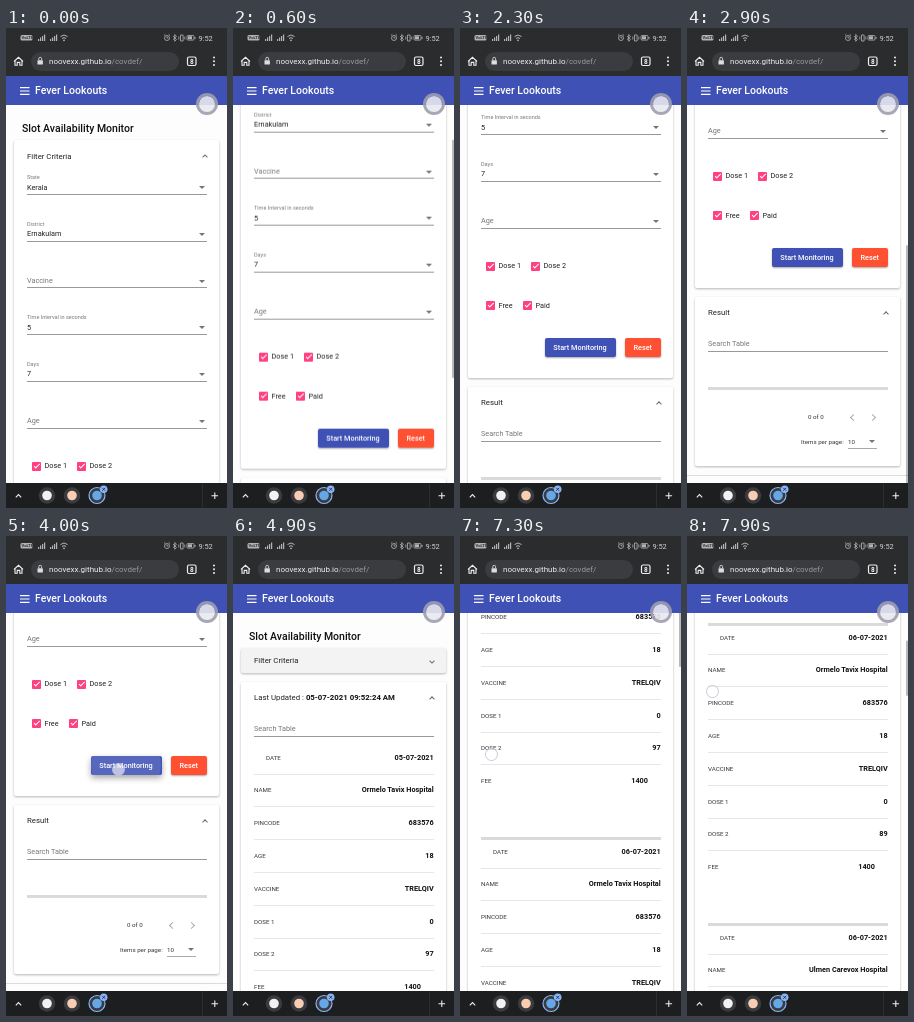
An HTML page that plays this animation: 221 by 480 pixels, repeating every 8000 ms.

```html
<!DOCTYPE html>
<html lang="en">
<head>
<meta charset="utf-8">
<title>Slot Availability Monitor</title>
<style>
html, body { margin: 0; width: 100%; height: 100%; overflow: hidden; background: #fdfdfd; }
#stage { position: relative; width: 221px; height: 480px; overflow: hidden; background: #fdfdfd;
  font: 7.3px/10px Roboto, sans-serif; color: #222; }
#stage div, #stage span, svg { position: absolute; box-sizing: border-box; }
#stage span, .btn { white-space: pre; }
#stage #page { left: 0; top: 0; width: 221px; height: 480px; }
#stage .card { position: relative; margin: 0 0 8.5px 8px; width: 205px; overflow: hidden;
  background: #fff; border-radius: 2px; }
#stage .wrap { position: relative; filter: drop-shadow(0 1px 1px rgba(0,0,0,.28)); }
#stage .foot { position: relative; height: 1px; background: #dcdcdc; }
.head { left: 0; top: 0; width: 205px; height: 33px; }
.head > * { top: calc(50% - 5px); }
.h2 { font-size: 10.5px; font-weight: 500; color: #111; }
.h3 { font-size: 7.8px; }
.label { font-size: 5.5px; color: #777; }
.hint { color: #777; }
.key { font-size: 6.2px; color: #333; }
b, .val { font-weight: 700; color: #111; }
.rule { left: 13px; width: 180px; height: 1px; background: #999; }
.thin { left: 13px; width: 180px; height: 1px; background: #e6e6e6; }
.thick { left: 13px; width: 180px; height: 3px; background: #dadada; }
.arrow { border: 3px solid transparent; border-top-color: #757575; border-bottom: 0; }
.caret { width: 4px; height: 4px; border: solid #666; border-width: 1px 0 0 1px; }
.box { width: 9px; height: 9px; border-radius: 1px; background: #ff4081; }
.box::after { content: ""; position: absolute; left: 1.8px; top: 2px; width: 4.6px; height: 2.2px;
  border: solid #fff; border-width: 0 0 1.2px 1.2px; transform: rotate(-45deg); }
.btn { height: 19px; border-radius: 2px; color: #fff; font-weight: 500; line-height: 19px;
  text-align: center; overflow: hidden; box-shadow: 0 1px 2px rgba(0,0,0,.35); }
#ripple { left: 0; top: -26px; width: 70px; height: 70px; border-radius: 50%; background: rgba(255,255,255,.13); }
.thumb { left: 218.5px; top: 48px; width: 2px; background: rgba(0,0,0,.27); }
#ring { left: -6.5px; top: -6.5px; width: 13px; height: 13px; border-radius: 50%;
  border: 1px solid rgba(185,185,210,.75); background: rgba(255,255,255,.6); }
#assist { left: 190px; top: 64.5px; width: 22px; height: 22px; border-radius: 50%;
  border: 3px solid rgba(158,158,174,.9); background: rgba(232,232,240,.9); background-clip: padding-box; }
svg { left: 0; top: 0; font-family: Roboto, sans-serif; }
</style>
</head>
<body>
<div id="stage">
  <div id="page">
    <span class="h2" style="left:16px;top:96px">Slot Availability Monitor</span>
    <div style="left:0;top:112px;width:221px">
      <div class="wrap"><div class="card" id="filter"><div class="head" id="filterHead">
        <span class="h3" style="left:13px">Filter Criteria</span>
        <span style="left:188px;width:5px;height:10px"><div class="caret" id="flip" style="left:.5px;top:3.5px"></div></span>
      </div></div></div>
      <div class="wrap"><div class="card" id="result">
        <div class="head"><span class="h3" id="idle" style="left:13px">Result</span>
          <span class="h3" id="done" style="left:13px">Last Updated : <b>05-07-2021 09:52:24 AM</b></span>
          <span style="left:188px;width:5px;height:10px"><div class="caret" style="left:.5px;top:4px;transform:rotate(45deg)"></div></span>
        </div>
        <div id="empty" style="left:0;top:0"></div>
        <div id="rows" style="left:0;top:0"></div>
      </div></div>
      <div class="foot"></div>
    </div>
  </div>
  <div class="thumb" id="thumbA" style="height:238px"></div>
  <div class="thumb" id="thumbB" style="height:55px"></div>
  <svg width="221" height="480">
    <path fill="#2b2c2e" d="M0 0h221v48H0z"/>
    <path fill="#3f51b5" d="M0 48h221v29H0z"/>
    <path fill="#1d1e20" d="M0 455h221v25H0z"/>
    <!-- status bar -->
    <g fill="#b4b4b4" font-size="7.4">
      <rect x="14.5" y="7" width="12" height="5.5" rx="1.5"/>
      <text x="15.5" y="11.4" font-size="4.2" font-weight="700" fill="#2b2c2e">VoLTE</text>
      <path d="M32 13v-2h1.2v2zM34 13v-3.5h1.2V13zM36 13V8h1.2v5zM38 13V6.5h1.2V13zM44 13v-2h1.2v2zM46 13v-3.5h1.2V13zM48 13V8h1.2v5zM50 13V6.5h1.2V13z"/>
      <path d="M54.5 8.5q3.5-3 7 0M56 10.5q2-1.7 4 0" fill="none" stroke="#b4b4b4"/>
      <circle cx="58" cy="12.3" r=".9"/>
      <g fill="none" stroke="#b4b4b4" stroke-width=".8">
        <circle cx="161" cy="10" r="2.5"/><path d="M161 8.5V10h1.3M158 7.5l1.3-1.2M164 7.5l-1.3-1.2"/>
        <path d="M167 8l3.5 3.5-1.8 1.8V6.5l1.8 1.8L167 11.7"/>
        <path d="M172.8 8.5v3M174.5 7h2.6v6h-2.6zM178.8 8.5v3"/>
        <rect x="181" y="7.5" width="7" height="4.6" rx="1"/>
      </g>
      <path d="M182 8.3h4v3h-4zM188.5 9h1v1.7h-1z"/>
      <text x="192.5" y="12.6" fill="#d0d0d0">9:52</text>
    </g>
    <!-- address bar -->
    <rect x="25" y="24" width="148" height="19" rx="9.5" fill="#3b3c40"/>
    <path d="M9 33v4.2h2.2v-2.8h2.6v2.8H16V33M8 33.5l4.5-4.2 4.5 4.2" fill="none" stroke="#eee" stroke-width="1.1"/>
    <rect x="31.5" y="32.2" width="5.4" height="4.4" rx=".6" fill="#ddd"/>
    <path d="M32.8 32v-1.3a1.4 1.4 0 0 1 2.8 0V32" fill="none" stroke="#ddd" stroke-width=".9"/>
    <text x="43" y="36.3" font-size="8" fill="#eee">noovexx.github.io<tspan fill="#999">/covdef/</tspan></text>
    <rect x="181.5" y="29" width="8.5" height="8.5" rx="1.5" fill="none" stroke="#eee" stroke-width="1.2"/>
    <text x="185.8" y="35.7" font-size="6.5" font-weight="700" fill="#eee" text-anchor="middle">8</text>
    <g fill="#eee"><circle cx="208" cy="29.5" r="1"/><circle cx="208" cy="33.3" r="1"/><circle cx="208" cy="37.1" r="1"/></g>
    <!-- app bar -->
    <path d="M14 59.7h9.5M14 63h9.5M14 66.3h9.5" stroke="#fff" stroke-width="1.2"/>
    <text x="29" y="66.4" font-size="10.5" font-weight="500" fill="#fff">Fever Lookouts</text>
    <!-- tab strip -->
    <path d="M196.5 455v25" stroke="#2c2d30"/>
    <path d="M9.8 469.3l2.7-2.7 2.7 2.7M205.5 467.8h6.6M208.8 464.5v6.6" fill="none" stroke="#eee" stroke-width="1.1"/>
    <g fill="#3a3b3f"><circle cx="41" cy="467.5" r="8.3"/><circle cx="66" cy="467.5" r="8.3"/></g>
    <circle cx="41" cy="467.5" r="4.8" fill="#f2f2f2"/>
    <circle cx="66" cy="467.5" r="4.8" fill="#f8cdb2"/>
    <circle cx="91" cy="467.5" r="8" fill="#3a3b3f" stroke="#8ab4f8" stroke-width="1.2"/>
    <circle cx="91" cy="467.5" r="4.8" fill="#64a8ea"/>
    <circle cx="97.7" cy="461.3" r="3.8" fill="#8ab4f8"/>
    <path d="M96.2 459.8l3 3M99.2 459.8l-3 3" stroke="#24324a" stroke-width=".9"/>
  </svg>
  <div id="assist"></div>
  <div id="ring"></div>
</div>
<script>
const $ = id => document.getElementById(id);

function add(box, tag, cls, css, text = '') {
  const el = document.createElement(tag);
  el.className = cls;
  el.style.cssText = css;
  el.textContent = text;
  box.append(el);
  return el;
}
// y is the vertical centre, relative to the card
const put = (box, cls, x, y, text) => add(box, 'span', cls, `left:${x}px;top:${y - 5}px`, text);
const putRight = (box, cls, x, y, text) => add(box, 'span', cls, `right:${205 - x}px;top:${y - 5}px`, text);
const line = (box, cls, y) => add(box, 'div', cls, `top:${y}px`);
const arrow = (box, x, y) => add(box, 'div', 'arrow', `left:${x - 3}px;top:${y - 1.5}px`);

// Filter form
const filter = $('filter');
[['State', 'Kerala'], ['District', 'Ernakulam'], ['Vaccine'], ['Time Interval in seconds', '5'], ['Days', '7'], ['Age']]
  .forEach(([name, value], i) => {
    const y = 47.6 + i * 46.7;
    if (value) {
      put(filter, 'label', 13, y - 10.5, name);
      put(filter, '', 13, y, value);
    } else put(filter, 'hint', 13, y, name);
    arrow(filter, 188, y);
    line(filter, 'rule', Math.round(y + 6.4));
  });
[[18, 326, 'Dose 1'], [63, 326, 'Dose 2'], [18, 365.5, 'Free'], [55, 365.5, 'Paid']].forEach(([x, y, name]) => {
  add(filter, 'div', 'box', `left:${x}px;top:${y - 4.5}px`);
  put(filter, '', x + 12.5, y, name);
});
const start = add(filter, 'div', 'btn', 'left:76.5px;top:397.5px;width:71px;background:#3f51b5', 'Start Monitoring');
add(filter, 'div', 'btn', 'left:157px;top:397.5px;width:35.5px;background:#ff5131', 'Reset');
const ripple = add(start, 'div', '', '');
ripple.id = 'ripple';

// Result table, before and after loading
const result = $('result'), empty = $('empty'), rows = $('rows');
put(result, 'hint', 13, 47.3, 'Search Table');
line(result, 'rule', 54);
empty.style.width = rows.style.width = '205px';
line(empty, 'thick', 90.5);
put(empty, 'key hint', 113, 120, '0 of 0');
for (const [x, turn] of [[155.5, -45], [174.5, 135]])
  add(empty, 'div', 'caret', `left:${x}px;top:118px;width:5px;height:5px;border-color:#aaa;transform:rotate(${turn}deg)`);
put(empty, 'key hint', 106, 145, 'Items per page:');
put(empty, 'key', 153, 145, '10');
arrow(empty, 177, 145);
add(empty, 'div', '', 'left:153px;top:151px;width:29px;height:1px;background:#aaa');

const slots = [
  ['05-07-2021', 'Ormelo Tavix Hospital', 97],
  ['06-07-2021', 'Ormelo Tavix Hospital', 89],
  ['06-07-2021', 'Ulmen Carevox Hospital', 64]
];
slots.forEach(([date, place, left], n) => {
  const cells = { DATE: date, NAME: place, PINCODE: '683576', AGE: 18, VACCINE: 'TRELQIV', 'DOSE 1': 0, 'DOSE 2': left, FEE: 1400 };
  if (n) line(rows, 'thick', 61 + n * 300);
  Object.entries(cells).forEach(([key, value], i) => {
    const y = 76 + n * 300 + i * 32.8;
    put(rows, 'key', key === 'DATE' ? 25 : 13, y, key);
    putRight(rows, 'val', key === 'FEE' ? 180 : 192.7, y, value);
    if (key !== 'FEE') line(rows, 'thin', Math.round(y + 15.5));
  });
});

const LOOP = 8000, TICK = 100;
function play(el, style, points, hold) {
  const all = [...points, [LOOP, points.at(-1)[1]]];
  el.animate(all.map(([t, v], i) => ({
    offset: t / LOOP,
    easing: `steps(${hold || i === all.length - 1 ? 1 : Math.max(1, Math.round((all[i + 1][0] - t) / TICK))}, end)`,
    ...style(v)
  })), { duration: LOOP, iterations: Infinity });
}
const moveY = v => ({ transform: `translateY(${v}px)` });
const move = ([x, y]) => ({ transform: `translate(${x}px, ${y}px)` });
const fade = v => ({ opacity: v });
const height = v => ({ height: v + 'px' });

const FOLD = 4200, FOLDED = 4500, LOADED = 4900;
const scroll = [[0, 0], [100, 0], [400, 72], [700, 128], [1000, 146], [1200, 146], [1300, 148], [1600, 188], [1900, 199],
  [2300, 200], [2600, 262], [2900, 290], [FOLD, 290], [FOLDED, 0], [6200, 0], [6300, 14], [6500, 76], [6700, 112],
  [7000, 128], [7100, 130], [7300, 206], [7400, 252], [7600, 284], [7700, 288], [7900, 420]];
play($('page'), v => moveY(-v), scroll);
play($('thumbA'), v => moveY(v * 407 / 697), scroll);
play($('thumbB'), v => moveY(v * .135), scroll);
play($('thumbA'), fade, [[0, 0], [200, 1], [2100, 0], [2400, 1], [3200, 0]], true);
play($('thumbB'), fade, [[0, 0], [6200, 1]], true);

play(filter, height, [[0, 438], [FOLD, 438], [FOLDED, 25]]);
play($('filterHead'), height, [[0, 33], [FOLD, 33], [FOLDED, 25]]);
play(filter, v => ({ backgroundColor: v }), [[0, '#fff'], [FOLDED, '#f3f3f3']], true);
play($('flip'), v => ({ transform: `rotate(${v}deg)` }), [[0, 45], [FOLD, 45], [FOLDED, 225]]);
play(result, height, [[0, 169.5], [LOADED, 3090]], true);
for (const id of ['idle', 'empty']) play($(id), fade, [[0, 1], [LOADED, 0]], true);
for (const id of ['done', 'rows']) play($(id), fade, [[0, 0], [LOADED, 1]], true);

const raise = v => ({ boxShadow: `0 ${v}px ${v * 2}px rgba(0,0,0,.35)` });
play(start, raise, [[0, 1], [3900, 3], [FOLD, 1]], true);
play(ripple, fade, [[0, 0], [3900, 1], [FOLD, 0]], true);
play(ripple, v => ({ transform: `scale(${v})` }), [[0, .1], [3800, .1], [4000, 1]]);
play($('ring'), move, [[0, [45, 310]], [200, [45, 290]], [500, [45, 220]], [1200, [42, 288]], [1300, [42, 285]],
  [1600, [43, 245]], [2400, [44, 280]], [2700, [44, 205]], [3800, [112, 233]], [4200, [112, 233]],
  [6200, [29, 339]], [6300, [29, 325]], [6500, [30, 263]], [7100, [32, 294]], [7300, [31, 218]],
  [7400, [30, 172]], [7700, [27, 287]], [7900, [25, 155]]]);
play($('ring'), fade, [[0, 0], [200, 1], [500, 0], [1200, 1], [1600, 0], [2400, 1], [2700, 0], [3800, 1], [4200, 0],
  [6200, 1], [6600, 0], [7100, 1], [7500, 0], [7700, 1]], true);
</script>
</body>
</html>
```
